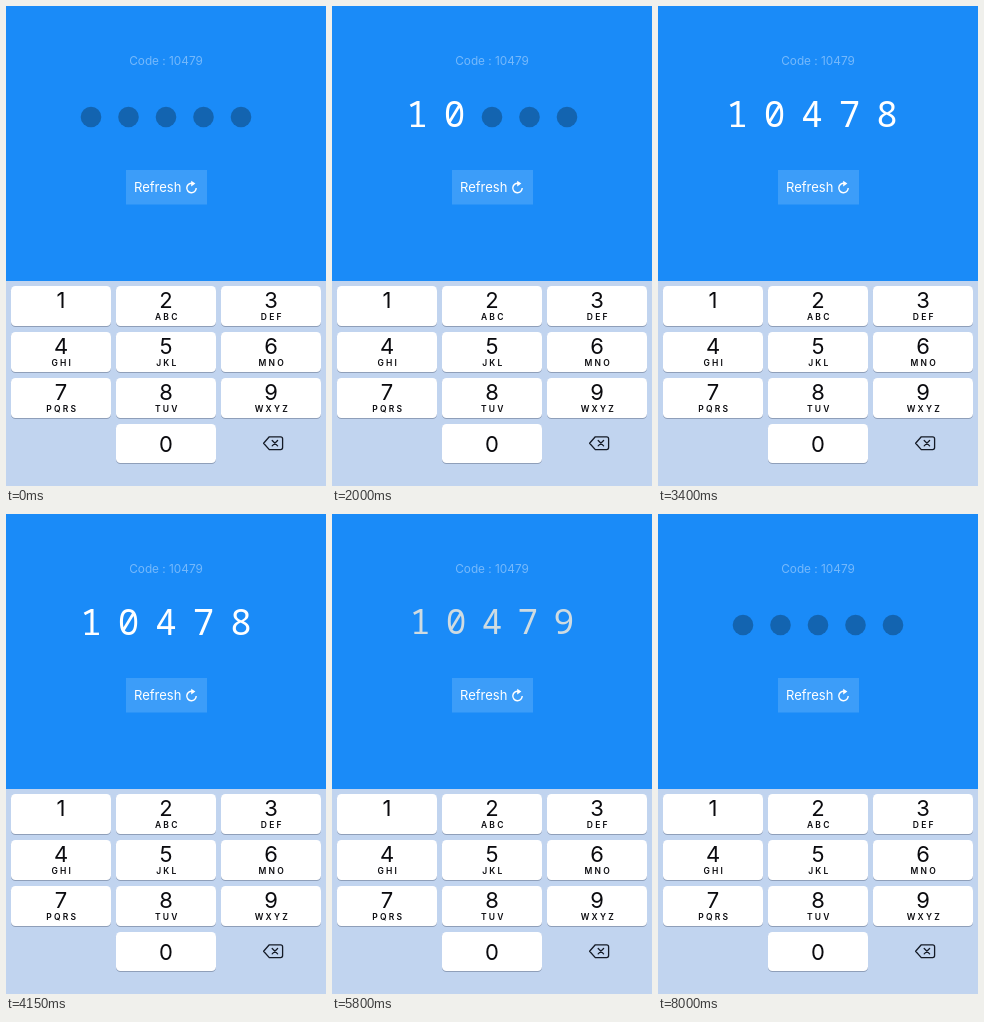
Recreate the animation shown at these times as an HTML page. Size 320 px wide and 480 px high, loop 8.1 s.

```html
<!DOCTYPE html>
<html lang="en">
<head>
<meta charset="utf-8">
<title>Code entry</title>
<style>
  html, body { margin: 0; width: 100%; height: 100%; overflow: hidden; background: #1a8bf8; }
  svg { display: block; width: 100%; height: 100%; font-family: Inter, "Open Sans", sans-serif; }
  .key text { text-anchor: middle; fill: #0b0b0f; }
  .num { font-size: 22px; }
  .abc { font-size: 8.5px; font-weight: 600; letter-spacing: 2.2px; }
  #code text { font: 36px "Noto Sans Mono", "DejaVu Sans Mono", monospace; text-anchor: middle; }
</style>
</head>
<body>
<svg viewBox="0 0 320 480">
  <rect width="320" height="480" fill="#1a8bf8"/>
  <text x="160" y="59" font-size="11.8" text-anchor="middle" fill="#76b9fb">Code : 10479</text>
  <g id="code"></g>
  <rect x="120" y="164" width="81" height="34.5" fill="#3c9df9"/>
  <text x="128" y="186" font-size="13" fill="#fff">Refresh</text>
  <path d="M186.5 177.4A4.7 4.7 0 1 0 190.2 182" fill="none" stroke="#fff" stroke-width="1.4"/>
  <path d="M185.2 174.8l4.2 2.7l-4.2 2.9z" fill="#fff"/>
  <rect y="275" width="320" height="205" fill="#c1d4ef"/>
  <g id="pad"></g>
  <g id="back" stroke="#141a26" stroke-width="1.3" stroke-linejoin="round" stroke-linecap="round">
    <path id="backShape" d="M263.3 430.8H274.6Q276.6 430.8 276.6 432.8V441.6Q276.6 443.6 274.6 443.6H263.3L257.6 437.2Z"/>
    <path id="cross" d="M266.2 434.5l5.4 5.4m0-5.4l-5.4 5.4"/>
  </g>
</svg>
<script>
const LOOP = 8100, CLEAR = 7850;
const SHAKE = { at: 3250, len: 600 };
const PULSE = { at: 5700, len: 500 };

// key, time it goes down, time it comes up
const presses = [
  ["1", 1400, 1550],
  ["0", 1800, 1950],
  ["4", 2350, 2500],
  ["7", 2950, 3100],
  ["8", 3150, 3300],
  ["back", 4500, 4550],
  ["9", 5250, 5350]
];
const letters = ["", "ABC", "DEF", "GHI", "JKL", "MNO", "PQRS", "TUV", "WXYZ"];
const $ = id => document.getElementById(id);

function keyMarkup(label, sub, col, row) {
  const x = 5 + col * 105, y = 280 + row * 46, h = row === 3 ? 39 : 40;
  const base = y + (row === 3 ? 27.5 : 22);
  return `<g class="key">
    <rect x="${x}" y="${y + 1}" width="100" height="${h}" rx="4.5" fill="#8f9fb9"/>
    <rect id="k${label}" x="${x}" y="${y}" width="100" height="${h}" rx="4.5"/>
    <text class="num" x="${x + 50}" y="${base}">${label}</text>
    <text class="abc" x="${x + 51.3}" y="${y + 34}">${sub}</text></g>`;
}

$("pad").innerHTML = letters
  .map((sub, i) => keyMarkup(i + 1, sub, i % 3, Math.floor(i / 3)))
  .join("") + keyMarkup(0, "", 1, 3);

function typedAt(t) {
  if (t >= CLEAR) return "";
  return presses
    .filter(p => t >= p[1])
    .reduce((s, [key]) => key === "back" ? s.slice(0, -1) : s + key, "");
}

const progress = (t, { at, len }) => Math.min(1, Math.max(0, (t - at) / len));

let shown = null;
function draw(now) {
  const t = now % LOOP;
  const typed = typedAt(t);
  if (typed !== shown) {
    shown = typed;
    $("code").innerHTML = Array.from({ length: 5 }, (_, i) => {
      const x = 85 + i * 37.5;
      return typed[i]
        ? `<text x="${x}" y="120.5">${typed[i]}</text>`
        : `<circle cx="${x}" cy="111" r="10.3" fill="#1364b0"/>`;
    }).join("");
  }

  const s = progress(t, SHAKE);
  const dx = 8 * (1 - s) * Math.sin(6 * Math.PI * s);
  const wave = Math.sin(2 * Math.PI * progress(t, PULSE));
  const dim = Math.max(0, wave);
  $("code").setAttribute("transform",
    `translate(${160 + dx} 108) scale(${1 - 0.045 * wave}) translate(-160 -108)`);
  $("code").setAttribute("fill",
    `rgb(${255 - 50 * dim}, ${255 - 38 * dim}, ${255 - 32 * dim})`);

  const held = presses.find(p => t >= p[1] && t < p[2]);
  const down = held ? held[0] : "";
  for (let i = 0; i < 10; i++) {
    $("k" + i).setAttribute("fill", down === String(i) ? "#9fc7ea" : "#fff");
  }
  $("backShape").setAttribute("fill", down === "back" ? "#141a26" : "none");
  $("cross").setAttribute("stroke", down === "back" ? "#c1d4ef" : "#141a26");
}

let start;
function frame(now) {
  start ??= now;
  draw(now - start);
  requestAnimationFrame(frame);
}
draw(0);
requestAnimationFrame(frame);
</script>
</body>
</html>
```
